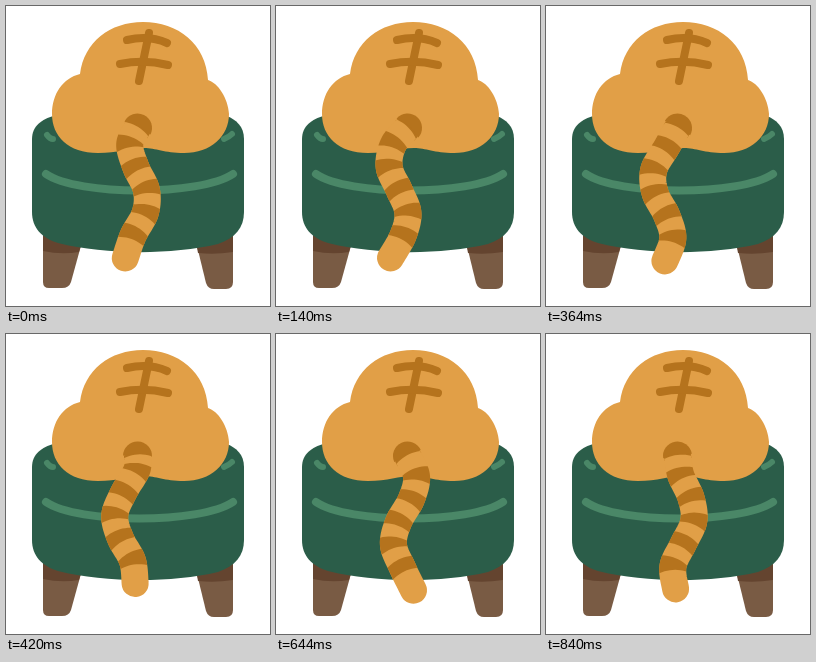
Write an HTML page with a canvas that moves like this. It is 264 px wide and 300 px high and loops after 0.98 s.

```html
<!DOCTYPE html>
<html lang="en">
<head>
<meta charset="utf-8">
<title>Cat on a stool</title>
<style>
html, body { margin: 0; width: 100%; height: 100%; overflow: hidden; background: #fff; }
canvas { display: block; width: 264px; height: 300px; }
</style>
</head>
<body>
<canvas id="stage" width="264" height="300"></canvas>
<script>
const ctx = document.getElementById('stage').getContext('2d');
const FUR = '#e19f47', STRIPE = '#b5731d', GREEN = '#2b5d49', SHINE = '#4a8767';
const LEG = '#795b44', SHADE = '#64442f';
const STEP = 140, POSES = 7, JOINTS = 6;
const ROOT = [131.5, 122], HALF = 13.5, BULGE = 2.5;

function fill(path, color) {
  ctx.fillStyle = color;
  ctx.fill(new Path2D(path));
}

function line(path, color, width) {
  ctx.strokeStyle = color;
  ctx.lineWidth = width;
  ctx.lineCap = ctx.lineJoin = 'round';
  ctx.stroke(new Path2D(path));
}

// A wave runs down the tail; a small faster bob shifts it vertically.
function tailJoints(pose) {
  const turn = 2 * Math.PI * pose / POSES;
  const bob = 3.5 * Math.cos(3 * (turn - 8 * Math.PI / POSES));
  const pts = [ROOT];
  for (let k = 1; k <= JOINTS; k++) {
    const swing = 21.5 * Math.cos(0.62 * (k - 2.5));
    pts.push([126 + 4 / k + swing * Math.cos(turn - 3.6 - 0.6 * k), 116.5 + 22.7 * k + bob]);
  }
  return pts;
}

function spline(pts, t) {
  const last = pts.length - 1;
  const i = Math.min(Math.floor(t), last - 1), u = t - i;
  const a = pts[Math.max(i - 1, 0)], b = pts[i], c = pts[i + 1], d = pts[Math.min(i + 2, last)];
  return [0, 1].map(k => b[k] + 0.5 * u * (c[k] - a[k] +
    u * (2 * a[k] - 5 * b[k] + 4 * c[k] - d[k] + u * (3 * (b[k] - c[k]) + d[k] - a[k]))));
}

function heading(pts, t) {
  const [x0, y0] = spline(pts, Math.max(t - 0.02, 0));
  const [x1, y1] = spline(pts, Math.min(t + 0.02, JOINTS));
  return Math.atan2(y1 - y0, x1 - x0);
}

// Piece of tail whose two ends arch towards the body.
function ribbon(pts, from, to, color) {
  const add = (t, side) => {
    const [x, y] = spline(pts, t), dir = heading(pts, t);
    const across = side * HALF, back = BULGE * (1 - side * side);
    ctx.lineTo(x - Math.sin(dir) * across - Math.cos(dir) * back,
               y + Math.cos(dir) * across - Math.sin(dir) * back);
  };
  const N = 10;
  ctx.beginPath();
  for (let n = 0; n <= N; n++) add(from, 2 * n / N - 1);
  for (let n = 1; n <= N; n++) add(from + (to - from) * n / N, 1);
  for (let n = 1; n <= N; n++) add(to, 1 - 2 * n / N);
  for (let n = 1; n < N; n++) add(to + (from - to) * n / N, -1);
  ctx.fillStyle = color;
  ctx.fill();
}

function drawScene() {
  fill('M37 228L76 236 65 276Q63 282 56 282H43Q37 282 37 276Z', LEG);
  fill('M37 228L76 236 73 246Q55 249 37 245Z', SHADE);
  fill('M190 236L227 230V276Q227 283 220 283H208Q202 283 200 277Z', LEG);
  fill('M190 236L227 230V246Q209 249 192 247Z', SHADE);
  fill('M48 110C36 113 26 120 26 133V206C26 222 36 232 52 237C100 249 165 249 212 238' +
    'C229 232 238 222 238 206V133C238 120 230 114 221 110Z', GREEN);
  line('M40 168C72 190 194 190 227 168', SHINE, 8);
  line('M41 129Q44 133 47 133', SHINE, 6);
  line('M218 133Q223 131 226 128', SHINE, 6);
  fill('M74 68C78 36 104 16 137 16C172 16 200 38 202 74C212 77 222 92 223 108' +
    'C223 130 205 147 178 147C158 147 150 142 138 142C122 142 112 147 92 147' +
    'C62 147 46 130 46 108C46 88 57 72 74 68Z', FUR);
  line('M143 27L133 75', STRIPE, 8);
  line('M121 34Q143 29 161 37', STRIPE, 8);
  line('M114 58Q138 53 162 59', STRIPE, 8);
}

function drawTail(pts) {
  let path = 'M' + ROOT;
  for (let t = 0.1; t < JOINTS + 0.05; t += 0.1) path += 'L' + spline(pts, Math.min(t, JOINTS));
  line(path, FUR, 2 * HALF);

  const dir = heading(pts, 0);
  ctx.fillStyle = STRIPE;
  ctx.beginPath();
  ctx.arc(...ROOT, HALF + 1, dir + Math.PI / 2, dir - Math.PI / 2);
  ctx.fill();
  ribbon(pts, 0, 0.25, STRIPE);
  ribbon(pts, 0.12, 0.75, FUR);
  for (let k = 1; k < JOINTS; k++) ribbon(pts, k - 0.25, k + 0.25, STRIPE);
}

function frame(now) {
  const pose = Math.floor(Math.max(now - start, 0) / STEP) % POSES;
  ctx.fillStyle = '#fff';
  ctx.fillRect(0, 0, 264, 300);
  drawScene();
  drawTail(tailJoints(pose));
  requestAnimationFrame(frame);
}

const start = performance.now();
frame(start);
</script>
</body>
</html>
```
